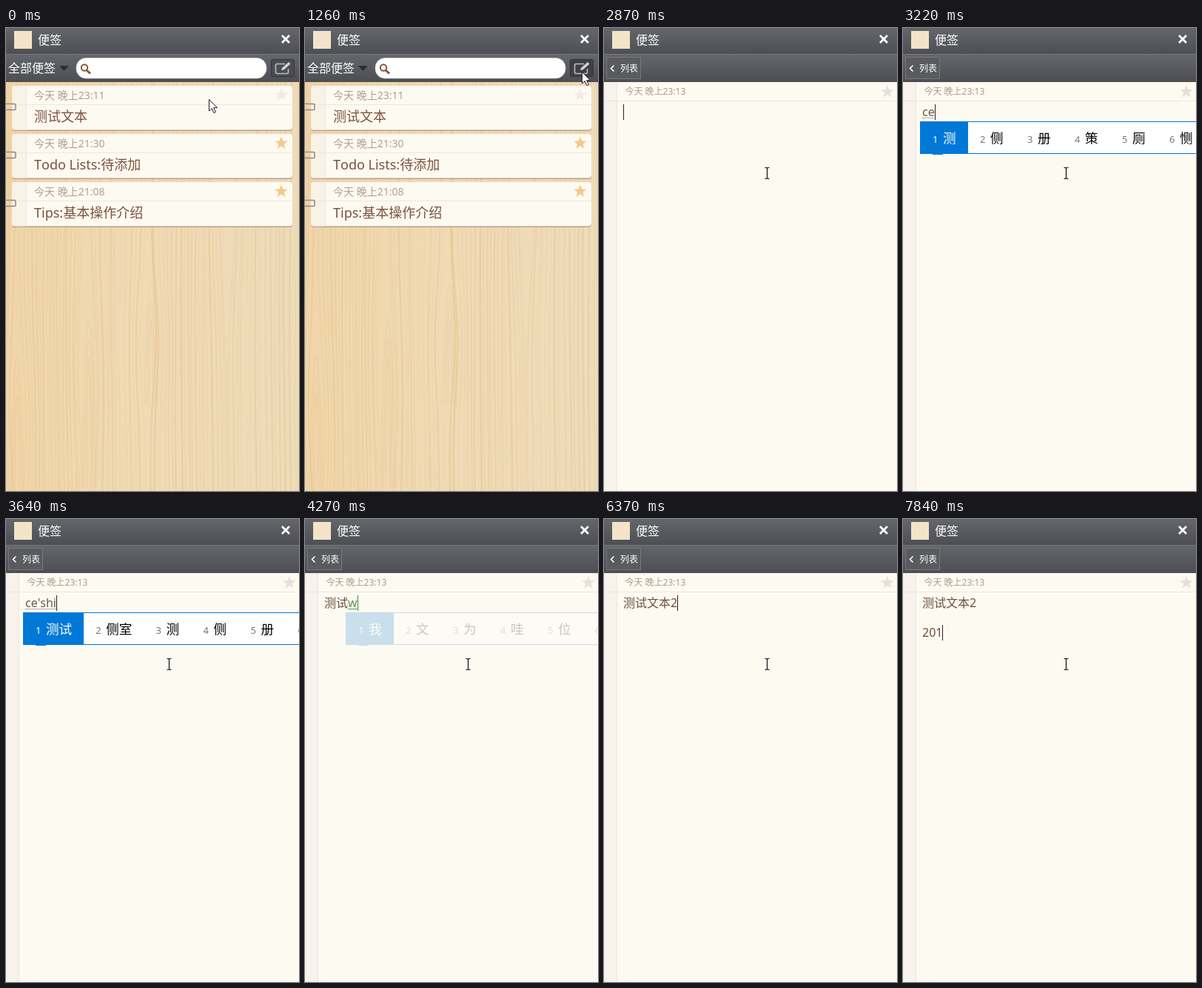
An HTML page for the animation above (8 s loop, 396 by 625 pixels).

```html
<!DOCTYPE html>
<html lang="zh-CN">
<head>
<meta charset="utf-8">
<style>
html, body { margin: 0; width: 100%; height: 100%; overflow: hidden; }
body { position: relative; font-family: "Noto Sans", "Noto Sans CJK SC", "Noto Sans CJK", sans-serif; font-kerning: none; }
svg, #note, #ime { position: absolute; left: 0; top: 0; }
#note { left: 26px; top: 103px; font-size: 16px; line-height: 20px; white-space: pre; color: #704f3a; }
#note u { color: #6b5c4f; text-decoration: underline dotted 1px; text-underline-offset: 2px; }
#note b { color: #82935c; font-weight: 400; }
#note u.fresh, #note u.fresh b { color: #55994a; text-decoration-style: solid; }
#note i { position: absolute; width: 1px; height: 21px; background: #222; }
#note u.fresh + i { background: #2f9a35; }
#ime { top: 126px; height: 42px; width: 420px; display: flex; background: #fff; border: solid #0078d7; border-width: 1px 0 1px 1px; line-height: 42px; font-size: 17.6px; color: #000; white-space: nowrap; }
#ime span { flex: none; box-sizing: border-box; min-width: 64px; padding: 0 16px; }
#ime small { display: inline-block; width: 14px; font-size: 13px; color: #777; }
#ime span:first-child, #ime span:first-child small { background: #0078d7; color: #fff; }
</style>
</head>
<body>
<svg width="396" height="625">
  <defs>
    <linearGradient id="bar" x2="0" y2="1"><stop stop-color="#63666b"/><stop offset="1" stop-color="#4d4e53"/></linearGradient>
    <linearGradient id="wood"><stop stop-color="#f0d5a9"/><stop offset=".45" stop-color="#efdab4"/><stop offset="1" stop-color="#eedbb9"/></linearGradient>
    <path id="star" d="M0-9L2.4-2.9 8.7-2.8 3.7 1.2 5.4 7.4 0 3.8-5.4 7.4-3.7 1.2-8.7-2.8-2.4-2.9Z"/>
  </defs>
  <g id="list">
    <rect y="72" width="396" height="553" fill="url(#wood)"/>
    <g id="grain" fill="none" stroke="#d9a763"/>
    <g id="cards"/>
  </g>
  <g id="page">
    <rect y="72" width="396" height="553" fill="#fdfaf2"/>
    <rect y="72" width="17" height="553" fill="#f7f2eb"/>
    <path d="M17.5 72V625M0 98.500H396" stroke="#ede7dc"/>
    <text x="28.500" y="90" font-size="12" fill="#b09a89">今天 晚上23:13</text>
    <use href="#star" x="383" y="86" fill="#e7e0da"/>
  </g>
  <rect width="396" height="36" fill="url(#bar)"/>
  <rect y="36" width="396" height="37" fill="url(#bar)"/>
  <path d="M0 35.500H396" stroke="#77797d"/>
  <path d="M0 72.500H396" stroke="#55504f"/>
  <rect x="11" y="4" width="24" height="24" fill="#f3e4c9"/>
  <text x="43" y="22" font-size="16" fill="#fff">便签</text>
  <path d="M373 10l10 10m0-10l-10 10" stroke="#fff" stroke-width="2.800"/>
  <g id="listBar">
    <text x="3" y="60" font-size="16" fill="#fff">全部便签</text>
    <path d="M72 51h13l-6.500 7z" fill="#2c2d30"/>
    <rect x="95" y="40.500" width="257" height="27.500" rx="13" fill="#fff" stroke="#d5d5d5" stroke-width=".6"/>
    <g fill="none" stroke="#84573d"><circle cx="106" cy="53.500" r="4.200" stroke-width="2"/><path d="M109 57l5 4.500" stroke-width="3"/></g>
    <rect id="newBtn" x="358.500" y="42.500" width="31" height="23" rx="2" stroke="#34353a"/>
    <path d="M377 48.500H366a1.500 1.500 0 0 0-1.500 1.500v10a1.500 1.500 0 0 0 1.500 1.500h14a1.500 1.500 0 0 0 1.500-1.500v-5" fill="none" stroke="#bcbdbf" stroke-width="1.600"/>
    <path d="M372 57l1-3 9-8 2.500 2.500-9 8z" fill="#d2d2d2"/>
  </g>
  <g id="pageBar">
    <rect x="3.500" y="39.500" width="46" height="29" fill="#595b5f" stroke="#76787c"/>
    <path d="M13.500 50.500l-4 4 4 4" fill="none" stroke="#fff" stroke-width="1.600"/>
    <text x="22" y="59" font-size="12" fill="#fff">列表</text>
  </g>
</svg>
<div id="note"></div>
<div id="ime"></div>
<svg width="396" height="625">
  <path id="arrow" d="M.5.500v15.500l3.700-3.400 2.700 6 2.500-1.100-2.700-5.800h4.800z" fill="#fff" stroke="#1c1c2c"/>
  <path id="beam" d="M-3-7.500h2l1 1 1-1h2M0-7V7M-3 7.500h2l1-1 1 1h2" transform="translate(220.500 196)" fill="none" stroke="#111" stroke-width="1.200"/>
</svg>
<script>
const LOOP = 8000, STEP = 70;
const $ = id => document.getElementById(id);
const show = (id, on) => $(id).style.display = on ? '' : 'none';

let seed = 7;
const rand = () => (seed = seed * 16807 % 2147483647) / 2147483647;

// Wood: near-vertical lines bent around a few knots, plus nested flame arcs.
const knots = [[15, 520, 130], [112, 470, 150], [196, 420, 90], [300, 250, 120]];
let grain = '';
for (let x0 = 2; x0 < 396; x0 += 3 + rand() * 5) {
  let d = '';
  const phase = rand() * 2;
  for (let y = 72; y <= 632; y += 20) {
    let x = x0 + 1.5 * Math.sin(y / 110 + phase);
    for (const [kx, ky, h] of knots) {
      const dx = x0 - kx;
      x += Math.sign(dx) * 8 * Math.exp(-((dx / 22) ** 2) - ((y - ky) / h) ** 2);
    }
    d += (d ? 'L' : 'M') + x.toFixed(1) + ' ' + y;
  }
  grain += `<path d="${d}" stroke-width="${1 + rand() * 1.5}" opacity="${.05 + rand() * .2}"/>`;
}
for (const [x, y, h] of knots.slice(0, 3))
  for (let k = 1; k < 4; k++)
    grain += `<path d="M${x - 3 * k} ${y + h}Q${x - 2 * k} ${y - k * 25} ${x} ${y - k * 25}T${x + 3 * k} ${y + h}" opacity=".2"/>`;
$('grain').innerHTML = grain;

const card = (time, title, star, i) => `<g transform="translate(0 ${78 + 65 * i})">
  <rect x="8" y="1" width="379" height="60" rx="4" fill="#b99f8c"/>
  <rect x="8" width="379" height="59.500" rx="4" fill="#fdfaf2"/>
  <path d="M27 0H12a4 4 0 0 0-4 4V55.500a4 4 0 0 0 4 4H27z" fill="#f8f2e7"/>
  <path d="M27.500 0V59.500M8 25.500H387" stroke="#eee7da"/>
  <path d="M0 24.500H11.500a1.500 1.500 0 0 1 1.500 1.500v5a1.500 1.500 0 0 1-1.500 1.500H0" fill="none" stroke="#8e8882" stroke-width="1.500"/>
  <path d="M0 26H11" stroke="#dedad4"/>
  <text x="38" y="18" font-size="14" fill="#b59d8b">今天 晚上${time}</text>
  <text x="38" y="48" font-size="18" fill="#7b523b">${title}</text>
  <use href="#star" x="372" y="12.500" fill="${star}"/></g>`;
$('cards').innerHTML = [
  ['23:11', '测试文本', '#efebe5'],
  ['21:30', 'Todo Lists:待添加', '#f5c987'],
  ['21:08', 'Tips:基本操作介绍', '#f5c987']
].map((c, i) => card(...c, i)).join('');

// [time, text, pinyin, candidates, input box opacity, caret hidden]
const done = '测试文本2';
const events = [
  [0, '', '', '', 0, 1],
  [1890, ''],
  [2380, '', '', '', 0, 1],
  [2870, ''],
  [3010, '', 'c', '才 从 次 错 曾 层', .2],
  [3080, '', 'c', '才 从 次 错 曾 层', 1],
  [3220, '', 'ce', '测 侧 册 策 厕 恻', 1],
  [3430, '', "ce's", '测试 测 侧 册 策 厕', 1],
  [3500, '', "ce'sh", '测试 测 侧 册 策 厕', 1],
  [3640, '', "ce'shi", '测试 侧室 测 侧 册 策', 1],
  [3850, '测试'],
  [4270, '测试', 'w', '我 文 为 哇 位 问', .2],
  [4340, '测试', 'w', '我 文 为 哇 位 问', 1],
  [4410, '测试', 'we', '为 问 位 文 未 喂', 1],
  [4480, '测试', 'wen', '问 文 稳 温 闻 吻', 1],
  [4690, '测试', "wen'b", '文本 问 文 稳 温 闻', 1],
  [4760, '测试', "wen'be", '文本 问 文 稳 温 闻', 1],
  [4970, '测试', "wen'ben", '文本 问 文 稳 温 闻', 1],
  [5040, '测试文本', '', '文本 问 文 稳 温 闻', .2],
  [5110, '测试文本'],
  [5390, done],
  [5880, done, '', '', 0, 1],
  [6370, done],
  [6440, done + '\n'],
  [6580, done + '\n\n'],
  [7140, done + '\n\n', '', '', 0, 1],
  [7210, done + '\n\n2'],
  [7350, done + '\n\n20'],
  [7770, done + '\n\n201']
];

let last;
function type(t) {
  const event = events.findLast(e => e[0] <= t);
  if (event === last) return;
  last = event;
  const [, text, pinyin = '', words = '', opacity = 0, hidden] = event;
  const first = pinyin[0] === 'w' ? '<b>w</b>' + pinyin.slice(1) : pinyin;
  const fresh = pinyin && opacity < 1 ? 'fresh' : '';
  $('note').innerHTML = text + (pinyin && `<u class="${fresh}">${first}</u>`) + (hidden ? '' : '<i></i>');
  $('ime').innerHTML = words.split(' ').map((w, i) => `<span><small>${i + 1}</small>${w}</span>`).join('');
  $('ime').style.left = (text ? 55 : 23) + 'px';
  $('ime').style.opacity = opacity;
}

const ease = (t, from, to) => {
  const p = Math.min(1, Math.max(0, (t - from) / (to - from)));
  return p * p * (3 - 2 * p);
};

function draw(now) {
  const t = Math.floor(now % LOOP / STEP) * STEP;
  const editing = t >= 1400;
  show('list', !editing);
  show('listBar', !editing);
  show('page', editing);
  show('pageBar', editing);
  $('newBtn').setAttribute('fill', t >= 1260 ? '#3f4045' : '#4b4c51');

  const a = ease(t, 0, 490), b = ease(t, 1540, 1890);
  const x = 274 + 100 * a - 154 * b, y = 96 - 37 * a + 137 * b;
  const text = editing && y > 103;
  $('arrow').setAttribute('transform', `translate(${Math.round(x)} ${Math.round(y)})`);
  $('beam').setAttribute('transform', `translate(${Math.round(x) + .5} ${Math.round(y)})`);
  show('arrow', !text);
  show('beam', text);
  type(t);
}

const start = performance.now();
function tick() {
  draw(performance.now() - start);
  requestAnimationFrame(tick);
}
tick();
</script>
</body>
</html>
```
